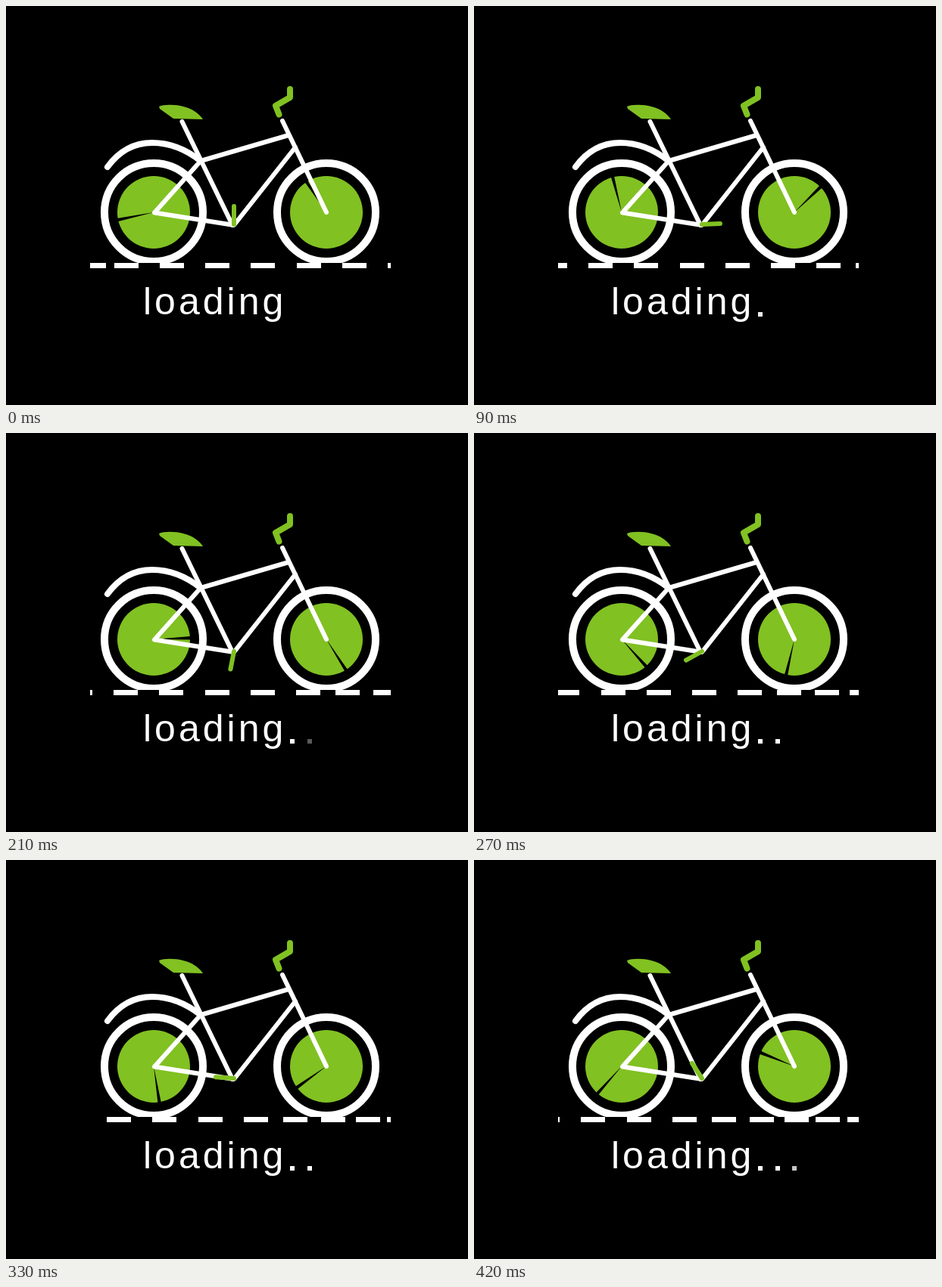
An HTML page with a canvas for the animation above (0.45 s loop, 610 by 528 pixels).

```html
<!DOCTYPE html>
<html lang="en">
<head>
<meta charset="utf-8">
<title>Loading</title>
<style>
html, body { margin: 0; width: 100%; height: 100%; overflow: hidden; background: #000; }
canvas { display: block; }
</style>
</head>
<body>
<canvas id="stage" width="610" height="528"></canvas>
<script>
const ctx = document.getElementById('stage').getContext('2d');
const WHITE = '#fff', GREEN = '#81c122', BLACK = '#000';
const STEP_MS = 30, STEPS = 15;

// Clockwise angles from straight up, in degrees, at the given steps
const KEY_STEPS = [0, 2, 5, 7, 9, 11, 14];
const CRANK = [0, 59, 144, 191, 241, 274, 327];
const REAR = [258, 317.5, 402, 448, 498, 531, 581.6];
const FRONT = [327, 380.3, 457, 507.6, 553, 594.3, 652];

// Road dash positions relative to the last evenly spaced dash
const DASHES = [-404, 0, 52, 102, 148, 189, 231];
for (let n = 1; n <= 6; n++) DASHES.push(-60.2 * n);

function angleAt(keys, step) {
  let i = 0;
  while (i < KEY_STEPS.length - 2 && step > KEY_STEPS[i + 1]) i++;
  const p = (step - KEY_STEPS[i]) / (KEY_STEPS[i + 1] - KEY_STEPS[i]);
  return (keys[i] + (keys[i + 1] - keys[i]) * p) * Math.PI / 180;
}

function stroke(path, color, width) {
  ctx.strokeStyle = color;
  ctx.lineWidth = width;
  ctx.stroke(new Path2D(path));
}

function circle(x, y, r) {
  ctx.beginPath();
  ctx.arc(x, y, r, 0, Math.PI * 2);
}

function wheel(x, y, angle) {
  circle(x, y, 65);
  ctx.strokeStyle = WHITE;
  ctx.lineWidth = 10;
  ctx.stroke();
  circle(x, y, 48);
  ctx.fillStyle = GREEN;
  ctx.fill();

  ctx.save();
  ctx.translate(x, y);
  ctx.rotate(angle);
  ctx.fillStyle = BLACK;
  ctx.fill(new Path2D('M0 0L-2.2 -49H2.2Z'));
  ctx.restore();
}

function frame() {
  stroke('M134 213C150 191 171 181 193 181C218 181 238 190 257 205', WHITE, 8);
  stroke('M232.5 153L299 290M257 205L373 171M365 152L423 273', WHITE, 6);
  stroke('M382 187L301 290L196 273.5L257 205', WHITE, 6);
  stroke('M375 110V121L356 132L360.5 143.5', GREEN, 8);
  ctx.fillStyle = GREEN;
  ctx.fill(new Path2D('M202 133C208 130 224 130 234 133C246 136 255 142 260 150L221 149L203 136Z'));
}

function crank(angle) {
  const dx = Math.sin(angle) * 24, dy = -Math.cos(angle) * 24;
  stroke(`M301 289l${dx} ${dy}`, GREEN, 6);
}

function road(step) {
  const left = 111, right = 508, anchor = 504 - 17.3 * step;
  ctx.fillStyle = BLACK;
  ctx.fillRect(left, 340, right - left, 7);
  ctx.fillStyle = WHITE;
  for (const offset of DASHES) {
    const start = Math.round(anchor + offset);
    const from = Math.max(left, start), to = Math.min(right, start + 32);
    if (to > from) ctx.fillRect(from, 340, to - from, 7);
  }
}

function label(step) {
  ctx.fillStyle = WHITE;
  ctx.font = '50px "Liberation Sans", Arial, sans-serif';
  ctx.letterSpacing = '4px';
  ctx.fillText('loading', 181, 408);
  [375, 398, 420].forEach((x, i) => {
    ctx.globalAlpha = Math.min(1, Math.max(0, (step - 0.2 - 5.75 * i) / 3));
    ctx.fillRect(x, 405, 6, 6);
  });
  ctx.globalAlpha = 1;
}

function draw(step) {
  ctx.fillStyle = BLACK;
  ctx.fillRect(0, 0, 610, 528);
  ctx.lineCap = ctx.lineJoin = 'round';
  wheel(195, 273, angleAt(REAR, step));
  wheel(423, 273, angleAt(FRONT, step));
  frame();
  crank(angleAt(CRANK, step));
  road(step);
  label(step);
}

function tick() {
  draw(Math.floor(performance.now() / STEP_MS) % STEPS);
  requestAnimationFrame(tick);
}
tick();
</script>
</body>
</html>
```
